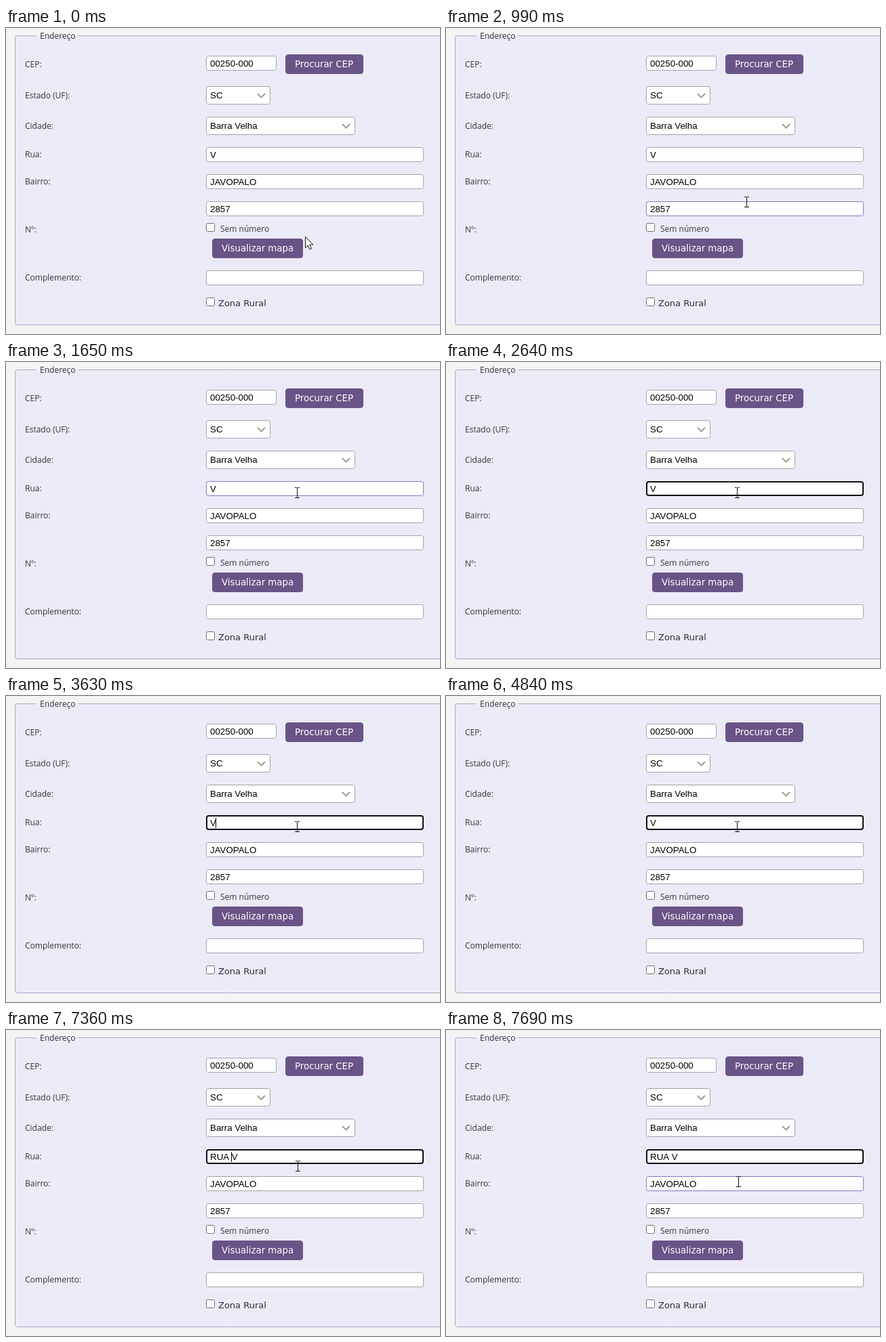
Write an HTML page with a canvas that moves like this. It is 640 px wide and 452 px high and loops after 8000 ms.

```html
<!DOCTYPE html>
<html lang="pt-BR">
<head>
<meta charset="utf-8">
<title>Endereço</title>
<style>
html, body { margin: 0; width: 100%; height: 100%; overflow: hidden; background: #f4f4f4; }
canvas { display: block; }
</style>
</head>
<body>
<canvas id="stage" width="640" height="452"></canvas>
<script>
const ctx = document.getElementById('stage').getContext('2d');
const LOOP = 8000;
const STEP = 110;
const BLINK = 530;
const LABEL = '12px "Open Sans", sans-serif';
const FIELD = '13.333px "Liberation Sans", Arial, sans-serif';
const BUTTON = '13.333px "DejaVu Sans", Verdana, sans-serif';
const CHECK = '13px "DejaVu Sans", Verdana, sans-serif';
const PANEL = '#eceaf7';
const LEFT = 295;

const FOCUS = 2090;
const HOME = 4290;
const PREFIX = 'RUA ';
const STREET = 'V';
const keyTimes = [5170, 5280, 5500, 5930];

function glide(t, start, steps) {
  const n = Math.floor((t - start) / STEP) + 1;
  return Math.max(0, Math.min(steps, n)) / steps;
}

function pointer(t) {
  const up = 1 - (1 - glide(t, 660, 10)) ** 1.15;
  const down = glide(t, 7360, 4);
  const arc = 30 * up * (1 - up);
  return [
    Math.round(441 - 12 * up + arc + 2 * down),
    Math.round(308 - 115 * up + 31 * down)
  ];
}

function caretOn(t) {
  const reset = [FOCUS, HOME, ...keyTimes].filter(k => k <= t).pop();
  return reset !== undefined && Math.floor((t - reset) / BLINK) % 2 === 0;
}

function text(str, x, y, font, color) {
  ctx.font = font;
  ctx.fillStyle = color;
  ctx.fillText(str, x, y);
}

function label(str, y, x = 28) {
  text(str, x, y, LABEL, '#36343c');
}

function box(x, y, w, h, r, fill, stroke, line = 1) {
  const d = line / 2;
  ctx.beginPath();
  ctx.roundRect(x + d, y + d, w - line, h - line, r);
  ctx.fillStyle = fill;
  ctx.fill();
  ctx.strokeStyle = stroke;
  ctx.lineWidth = line;
  ctx.stroke();
}

function input(y, value, my, { w = 321, focus = false } = {}) {
  const hover = my >= y && my < y + 22;
  const edge = focus ? '#101014' : hover ? '#9172c4' : '#a3a3a8';
  box(LEFT, y, w, 22, 3, '#fff', edge, focus ? 2 : 1);
  text(value, LEFT + 6, y + 16, FIELD, '#000');
}

function select(y, value, w) {
  box(LEFT, y, w, 27, 3, '#fff', '#a3a3a8');
  text(value, LEFT + 6, y + 18, FIELD, '#000');
  const x = LEFT + w - 13.5;
  ctx.beginPath();
  ctx.moveTo(x - 5.5, y + 11);
  ctx.lineTo(x, y + 16.5);
  ctx.lineTo(x + 5.5, y + 11);
  ctx.strokeStyle = '#a89a90';
  ctx.lineWidth = 2;
  ctx.stroke();
}

function button(x, y, w, str) {
  box(x, y, w, 29, 3.5, '#685486', '#685486');
  text(str, x + 14, y + 19, BUTTON, '#fff');
}

function checkbox(y) {
  box(LEFT, y, 13, 13, 2, '#fff', '#6f6f73');
}

function arrow(x, y) {
  const pts = [[0, 0], [0, 16], [3.7, 12.5], [6.5, 18.5], [9, 17.3], [6.4, 11.5], [11.3, 11.5]];
  ctx.beginPath();
  for (const [px, py] of pts) ctx.lineTo(x + px + .5, y + py + .5);
  ctx.closePath();
  ctx.fillStyle = '#fff';
  ctx.fill();
  ctx.strokeStyle = '#111';
  ctx.lineWidth = 1;
  ctx.stroke();
}

function beam(x, y) {
  ctx.fillStyle = '#111';
  ctx.fillRect(x, y - 7, 1, 15);
  for (const ey of [y - 8, y + 7]) {
    ctx.fillRect(x - 3, ey, 3, 1);
    ctx.fillRect(x + 1, ey, 3, 1);
  }
}

function panel() {
  ctx.fillStyle = '#f4f4f4';
  ctx.fillRect(0, 0, 640, 452);
  box(13, 11, 660, 428, 3, PANEL, '#aba8c9');
  ctx.fillStyle = PANEL;
  ctx.fillRect(44, 11, 62, 1);
  label('Endereço', 16, 50);
}

function street(t, my) {
  const typed = PREFIX.slice(0, keyTimes.filter(k => k <= t).length);
  const before = t < HOME ? STREET : typed;
  label('Rua:', 191);
  input(176, typed + STREET, my, { focus: t >= FOCUS });
  if (caretOn(t)) {
    ctx.fillRect(Math.floor(LEFT + 6 + ctx.measureText(before).width), 180, 1, 15);
  }
}

function draw(t) {
  const [mx, my] = pointer(t);
  panel();

  label('CEP:', 58);
  input(41, '00250-000', my, { w: 104 });
  button(412, 39, 115, 'Procurar CEP');

  label('Estado (UF):', 104);
  select(86, 'SC', 95);
  label('Cidade:', 149);
  select(131, 'Barra Velha', 220);

  street(t, my);
  label('Bairro:', 231);
  input(216, 'JAVOPALO', my);

  label('Nº:', 302);
  input(256, '2857', my);
  checkbox(288);
  label('Sem número', 301, 316);
  button(304, 311, 134, 'Visualizar mapa');

  label('Complemento:', 373);
  input(358, '', my);
  checkbox(398);
  text('Zona Rural', 313, 411, CHECK, '#2c2a33');

  if (my > 278) arrow(mx, my);
  else beam(mx, my);
}

const start = performance.now();
function tick() {
  draw((performance.now() - start) % LOOP);
  requestAnimationFrame(tick);
}
tick();
</script>
</body>
</html>
```
